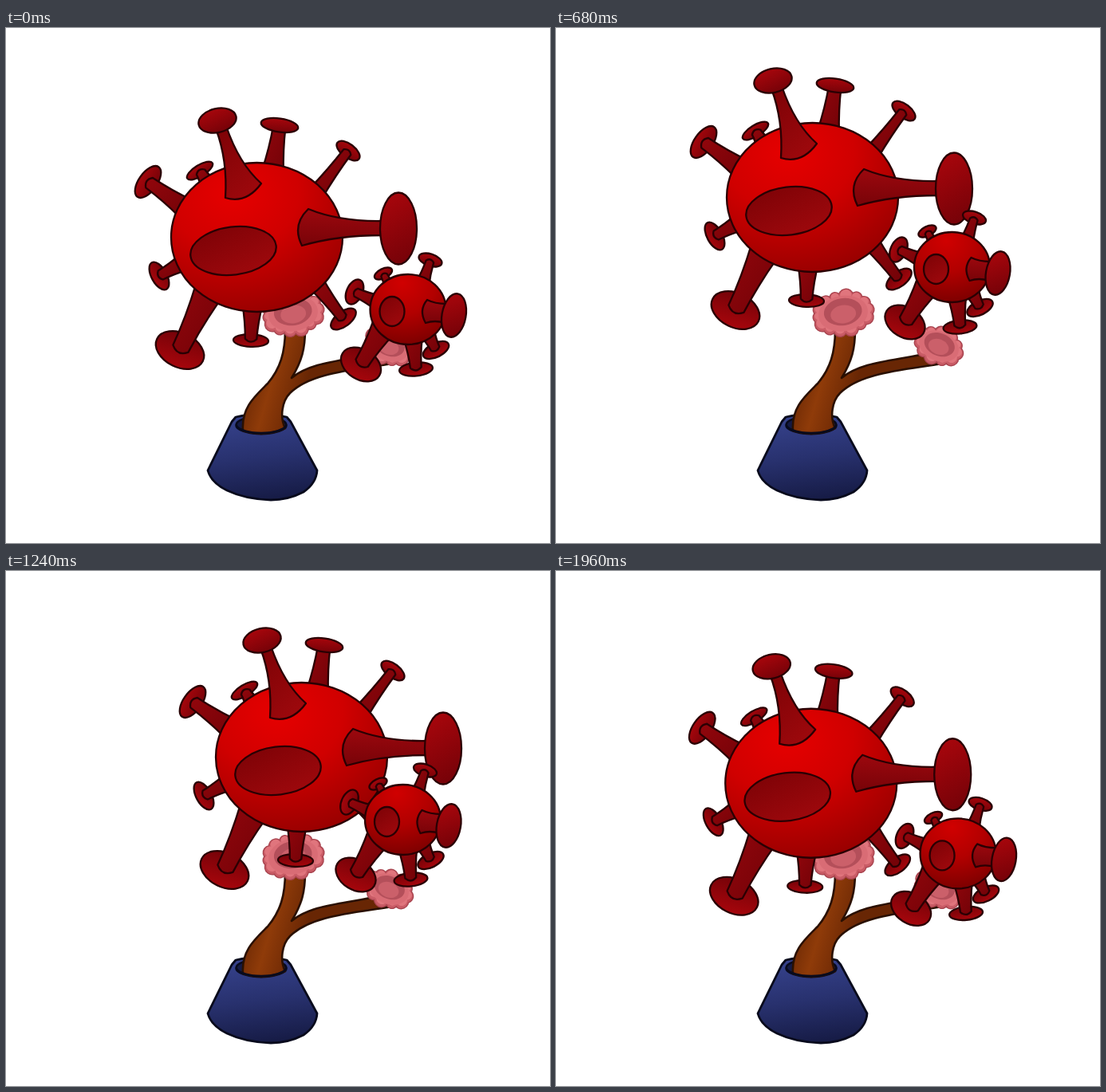
An HTML page that plays this animation: 682x646 px, repeating every 2040 ms.

```html
<!DOCTYPE html>
<html lang="en">
<head>
<meta charset="utf-8">
<title>Potted virus plant</title>
<style>
  html, body { margin: 0; width: 100%; height: 100%; overflow: hidden; background: #fff; }
  svg { display: block; width: 682px; height: 646px; }
  .line { stroke: #2a0003; stroke-width: 2.3; stroke-linejoin: round; }
  .wood { stroke: #2a1002; stroke-width: 2.6; stroke-linejoin: round; }
  .clay { stroke: #080a1c; stroke-width: 2.8; stroke-linejoin: round; }
</style>
</head>
<body>
<svg viewBox="0 0 682 646" xmlns="http://www.w3.org/2000/svg">
  <defs>
    <radialGradient id="body" cx=".36" cy=".2" r=".85">
      <stop offset="0" stop-color="#e60000"/>
      <stop offset=".45" stop-color="#d00000"/>
      <stop offset="1" stop-color="#960000"/>
    </radialGradient>
    <radialGradient id="bud" cx=".42" cy=".12" r=".9">
      <stop offset="0" stop-color="#d00000"/>
      <stop offset=".5" stop-color="#b20000"/>
      <stop offset="1" stop-color="#7c0000"/>
    </radialGradient>
    <linearGradient id="cap" x1=".3" y1="0" x2=".6" y2="1">
      <stop offset="0" stop-color="#a8060c"/>
      <stop offset="1" stop-color="#760208"/>
    </linearGradient>
    <linearGradient id="stalk" x1="0" y1="0" x2="1" y2="1">
      <stop offset="0" stop-color="#92060c"/>
      <stop offset="1" stop-color="#720207"/>
    </linearGradient>
    <linearGradient id="blob" x1="0" y1="0" x2=".6" y2="1">
      <stop offset="0" stop-color="#7c0206"/>
      <stop offset="1" stop-color="#9c080c"/>
    </linearGradient>
    <linearGradient id="arm" x1="0" y1="0" x2="0" y2="1">
      <stop offset="0" stop-color="#9c080e"/>
      <stop offset="1" stop-color="#780308"/>
    </linearGradient>
    <linearGradient id="pot" x1=".4" y1="0" x2=".55" y2="1">
      <stop offset="0" stop-color="#36428c"/>
      <stop offset=".5" stop-color="#28316e"/>
      <stop offset="1" stop-color="#161b45"/>
    </linearGradient>
    <linearGradient id="trunk" gradientUnits="userSpaceOnUse" x1="296" y1="470" x2="364" y2="490">
      <stop offset="0" stop-color="#6e2a05"/>
      <stop offset=".4" stop-color="#8f3b09"/>
      <stop offset="1" stop-color="#682604"/>
    </linearGradient>
  </defs>

  <path class="clay" fill="url(#pot)"
    d="M288 488Q319 481 352 488L357 494L390 555Q389 571 373 582Q354 592 332 592Q300 591 277 580Q257 570 253 555L283 494Z"/>
  <ellipse class="clay" cx="320" cy="498" rx="31.5" ry="11" fill="#141a44"/>
  <path class="wood" fill="url(#trunk)"
    d="M297 505C295 476 312 462 328 446C344 427 350 407 350 378L375 378C375 402 371 418 358 439C386 416 432 418 478 405L484 421C436 429 382 432 356 458C346 468 343 488 350 502Q324 514 297 505Z"/>
  <path class="clay" d="M289 499A31.5 11 0 0 0 351 499" fill="none"/>
  <g id="flowers"></g>
  <g id="big"></g>
  <g id="small"></g>
</svg>
<script>
const $ = id => document.getElementById(id);

function add(parent, tag, attrs) {
  const el = document.createElementNS("http://www.w3.org/2000/svg", tag);
  for (const key in attrs) el.setAttribute(key, attrs[key]);
  return parent.appendChild(el);
}

function oval(parent, cx, cy, rx, ry, rot, fill, cls = "line") {
  add(parent, "ellipse", { cx, cy, rx, ry, fill, class: cls, transform: `rotate(${rot} ${cx} ${cy})` });
}

const shape = (parent, d, fill) => add(parent, "path", { d, fill, class: "line" });

function flower(cx, cy, rx, ry, rot, bumps) {
  const g = add($("flowers"), "g", { transform: `translate(${cx} ${cy}) rotate(${rot})` });
  const ring = (r, fill, dy) => {
    for (let i = 0; i < bumps; i++) {
      const a = i / bumps * 2 * Math.PI;
      add(g, "circle", {
        cx: Math.cos(a) * (rx - 9), cy: Math.sin(a) * (ry - 9) + dy,
        r: r + 1.2 * Math.sin(i * 2.4), fill
      });
    }
  };
  const disc = (scale, dy, fill) => oval(g, 0, dy, rx * scale, ry * scale * 0.95, 0, fill, "");
  ring(9, "#a8444f", 0);
  ring(7.6, "#c95c66", 0);
  ring(6, "#e0757d", -1.5);
  disc(0.78, 0, "#d96c75");
  disc(0.6, -2, "#b44f5a");
  disc(0.4, 1, "#cb606a");
}

// A virus: an oval body whose spikes point from their caps to its middle.
function virus(id, x, y, rx, ry, fill) {
  const g = $(id);
  const flatten = 0.72;

  function spike(cx, cy, r, squash = 0.5) {
    const dx = x - cx, dy = y - cy;
    const dist = Math.hypot(dx, dy);
    const gap = dist * (1 - 1 / Math.hypot(dx / rx, dy / ry)) + 10;
    const len = Math.hypot(dx * flatten, dy);
    const ux = dx * flatten / len, uy = dy / len;
    const at = (along, side) =>
      `${(cx + ux * along - uy * side).toFixed(1)} ${(cy + uy * along + ux * side).toFixed(1)}`;
    const tip = r * 0.33, base = r * 0.58, mid = r * 0.36;

    const cap = () => oval(g, cx, cy, r, r * squash, Math.atan2(-ux, uy) * 180 / Math.PI % 180, "url(#cap)");
    const stalk = () => shape(g, `M${at(gap, base)}Q${at(gap / 2, mid)} ${at(2, tip)}` +
      `Q${at(2 - tip, 0)} ${at(2, -tip)}Q${at(gap / 2, -mid)} ${at(gap, -base)}Z`, "url(#stalk)");
    // Upright caps hide the end of their stalk.
    const order = uy > 0.97 ? [stalk, cap] : [cap, stalk];
    order.forEach(part => part());
  }

  const trunk = () => oval(g, x, y, rx, ry, 0, `url(#${fill})`);
  return { g, spike, trunk };
}

flower(360, 358, 40, 30, -9, 14);
flower(480, 399, 33, 25, 22, 11);

const big = virus("big", 314.5, 262.5, 107.5, 93.5, "body");
big.spike(343, 122, 23.5, 0.36);
big.spike(429, 154, 17);
big.spike(178, 193, 23);
big.spike(243, 179, 18.5, 0.38);
big.spike(192, 311, 19);
big.spike(218, 404, 32, 0.67);
big.spike(307, 392, 22, 0.36);
big.spike(423, 365, 18.5);
big.trunk();
oval(big.g, 285, 279.5, 54, 30, -7, "url(#blob)");
shape(big.g, "M263 126Q278 166 275 213Q301 221 320 195Q292 170 276 123Z", "url(#blob)");
oval(big.g, 265, 116, 24, 15, -13, "url(#cap)");
shape(big.g, "M379 227Q418 243 472 242L472 260Q416 260 371 273Q358 247 379 227Z", "url(#arm)");
oval(big.g, 492, 251.5, 23, 45, 0, "url(#cap)");

const small = virus("small", 504, 353, 47.5, 44, "bud");
small.spike(532, 291, 15);
small.spike(473, 308, 12);
small.spike(437, 331, 16.5, 0.6);
small.spike(445, 422, 27, 0.7);
small.spike(514, 428, 21, 0.4);
small.spike(539, 404, 17.5);
small.trunk();
oval(small.g, 484, 355.5, 15.5, 18.5, 0, "url(#blob)");
shape(small.g, "M528 341Q538 346 552 346L550 370Q538 366 526 370Q517 354 528 341Z", "url(#arm)");
oval(small.g, 561.5, 360.5, 15, 27.5, 10, "url(#cap)");

const STEPS = 26, LOOP = 2040;

// Key poses of the drift: step, big x, big y, small x, small y.
const keys = [
  [0, 0, 0, 0, 0],
  [6, -13, -41, -5, -31],
  [9, 7, -50, -7.5, -53],
  [12, 32, -48, -8.5, -63],
  [16, 56, -29, -6.5, -41],
  [18, 57.5, -12, -4, -26],
  [22, 27.5, 5.5, -1.5, -4.5]
];

function key(i) {
  const turn = Math.floor(i / keys.length);
  const [step, ...pose] = keys[i - turn * keys.length];
  return { step: step + turn * STEPS, pose };
}

// Smooth closed curve through the key poses.
function poseAt(step) {
  let i = keys.length - 1;
  while (keys[i][0] > step) i--;
  const [a, b, c, d] = [i - 1, i, i + 1, i + 2].map(key);
  const h = c.step - b.step, u = (step - b.step) / h;
  return b.pose.map((p, j) => {
    const q = c.pose[j];
    const m = (q - a.pose[j]) / (c.step - a.step) * h;
    const n = (d.pose[j] - p) / (d.step - b.step) * h;
    return p + u * (m + u * (3 * (q - p) - 2 * m - n + u * (2 * (p - q) + m + n)));
  });
}

const start = performance.now();

function draw() {
  const t = (performance.now() - start) % LOOP;
  const [bx, by, sx, sy] = poseAt(Math.floor((t + 40) / 80));
  big.g.setAttribute("transform", `translate(${bx} ${by})`);
  small.g.setAttribute("transform", `translate(${sx} ${sy})`);
  requestAnimationFrame(draw);
}
draw();
</script>
</body>
</html>
```
